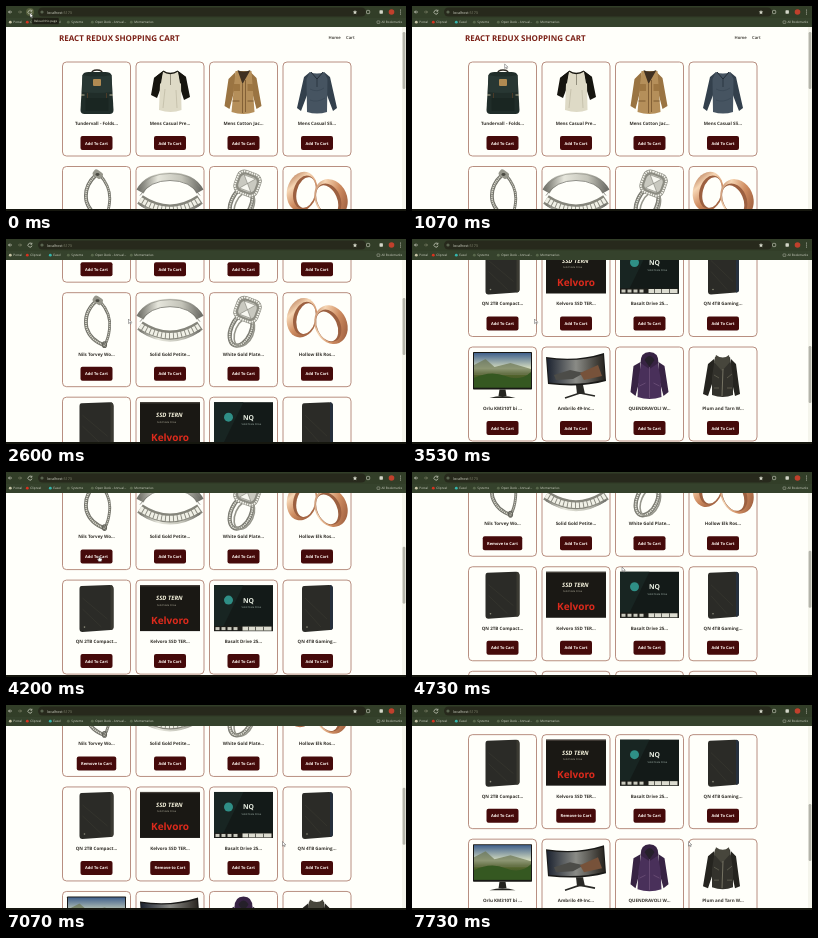
An HTML page that plays this animation: 400x205 px, repeating every 8000 ms.

```html
<!DOCTYPE html>
<html lang="en">
<head>
<meta charset="utf-8">
<title>Shopping cart</title>
<style>
html, body { margin: 0; width: 100%; height: 100%; overflow: hidden; background: #fffffa; }
svg { display: block; width: 100vw; height: 100vh; }
text { font-family: "Open Sans", "Noto Sans", sans-serif; text-rendering: geometricPrecision; }
</style>
</head>
<body>
<svg id="stage" viewBox="0 0 400 205">
  <defs>
    <linearGradient id="rose" x2="1" y2="1">
      <stop offset="0" stop-color="#a5623e"/><stop offset=".3" stop-color="#f6d6b4"/>
      <stop offset=".6" stop-color="#d08e62"/><stop offset="1" stop-color="#8a4c30"/>
    </linearGradient>
    <linearGradient id="silver">
      <stop offset="0" stop-color="#77776f"/><stop offset=".3" stop-color="#e6e6dc"/>
      <stop offset=".7" stop-color="#c3c3b8"/><stop offset="1" stop-color="#70706a"/>
    </linearGradient>
    <linearGradient id="sky" x2="0" y2="1">
      <stop offset="0" stop-color="#41618c"/><stop offset=".45" stop-color="#d8dfc0"/>
      <stop offset=".6" stop-color="#56662c"/><stop offset="1" stop-color="#2f4a22"/>
    </linearGradient>
    <linearGradient id="glow">
      <stop offset="0" stop-color="#1c2330"/><stop offset=".5" stop-color="#8a8b86"/>
      <stop offset="1" stop-color="#26221c"/>
    </linearGradient>
    <clipPath id="view"><rect y="21" width="400" height="182"/></clipPath>
  </defs>
  <rect width="400" height="205" fill="#fffffa"/>
  <g clip-path="url(#view)">
    <g id="page"></g>
    <rect x="396" y="21" width="4" height="182" fill="#f5f5ec"/>
    <rect id="thumb" x="396.6" width="2.8" height="57" rx="1.3" fill="#b4b4aa"/>
  </g>
  <g id="chrome"></g>
  <g id="tip"></g>
  <path id="arrow" d="M0 0V4.6L1.1 3.6L1.9 5.2L2.6 4.9L1.9 3.3H3.3Z" fill="#fff" stroke="#333" stroke-width=".4"/>
  <path id="hand" d="M-.4 0Q.4 -.6 .7 .2V2L2.8 2.6Q3.2 3 2.9 4L2.3 5.4H-.3L-1.7 3.3Q-1.5 2.5-.4 3.2Z" fill="#fff" stroke="#333" stroke-width=".4"/>
</svg>
<script>
const LOOP = 8000, PITCH_X = 73.5, PITCH_Y = 104.5;
const NOTCH = 26.15, GLIDE = 150;
const $ = id => document.getElementById(id);

const rect = (x, y, w, h, fill, rx = 0, more = '') =>
  `<rect x="${x}" y="${y}" width="${w}" height="${h}" rx="${rx}" fill="${fill}" ${more}/>`;
const path = (d, fill, stroke = 'none', w = .5, more = '') =>
  `<path d="${d}" fill="${fill}" stroke="${stroke}" stroke-width="${w}" ${more}/>`;
const line = (d, stroke, w = .5, more = '') => path(d, 'none', stroke, w, more);
const dot = (x, y, r, fill, more = '') => `<circle cx="${x}" cy="${y}" r="${r}" fill="${fill}" ${more}/>`;
const oval = (x, y, rx, ry, fill, stroke = 'none', w = 0, more = '') =>
  `<ellipse cx="${x}" cy="${y}" rx="${rx}" ry="${ry}" fill="${fill}" stroke="${stroke}" stroke-width="${w}" ${more}/>`;
const turn = (deg, x, y, body) => `<g transform="rotate(${deg} ${x} ${y})">${body}</g>`;
const text = (x, y, size, fill, str, weight = 400, anchor = 'start') =>
  `<text x="${x}" y="${y}" font-size="${size}" fill="${fill}" font-weight="${weight}" text-anchor="${anchor}">${str}</text>`;

// Product pictures, drawn inside a 68 x 94 card
const backpack = () =>
  line('M29 12Q29 8 34.5 8T40 12', '#2b2620', 1.4) +
  path('M20 13Q21 10 26 10H43Q48 10 49 13L51 48Q51 52 47 52H22Q18 52 18 48Z', '#202d29') +
  path('M20 13Q34 16 49 13L49.5 30Q34 32 19.5 30Z', '#283733') +
  line('M25 31V49M44 31V49', '#4a3a28', 1) +
  rect(30.5, 17, 8, 7, '#b08a52', 1) + rect(23, 36, 23, 13, '#1a2622', 1) +
  line('M18.5 33H22M47 33H50.5', '#c9c2a4', .9);

const raglan = () =>
  path('M27 9L18 16L15 33L21 36L26 23ZM42 9L50 15L54 35L48 38L43 23Z', '#16150f') +
  path('M27 9Q34 13 42 9L45 22L45.5 48Q35 52 23 48L24 22Z', '#dedac6') +
  path('M27 9L18 16L20 25L25 21ZM42 9L50 15L50 25L44 21Z', '#16150f') +
  line('M27 9Q34 14 42 9', '#16150f', 1.4) + line('M34.5 12V23', '#726d5c', .7) +
  line('M29 27L27 46M40 28L41 46', '#c2bda7', .8);

const jacket = () =>
  path('M26 10L19 17L15 44L20 47L25 28ZM41 10L47 16L52 44L47 47L42 28Z', '#9a7442') +
  path('M26 9L42 9L45 50Q34 54 22 50Z', '#b58f5a') +
  path('M28 8L33 22L41 8Q34 11 28 8Z', '#3f3022') +
  line('M33 22V51M36 18V50', '#6d4c28', .7) +
  rect(24, 22, 6.5, 7, '#9d7642', .6) + rect(38, 22, 5.5, 7, '#9d7642', .6) +
  line('M23 39H30M38 39H44', '#6d4c28', .8);

const longSleeve = () =>
  path('M27 10L21 15L14 46L18 49L26 28ZM41 10L47 15L54 46L50 49L42 28Z', '#33404c') +
  path('M27 10Q34 13 41 10L44.5 17L44 50Q34 53 24 50L23.5 17Z', '#465461') +
  line('M28 10L34 17L40 10', '#222c35', 1) + line('M34 17V25', '#222c35', .7) +
  line('M27 27Q34 31 41 26M27 38Q34 41 42 36', '#394753', .7);

const bracelet = () => {
  const left = 'M33 9Q21 20 24 35Q28 48 43 53', right = 'M37 8Q49 21 47 36Q46 46 42 53';
  return line(left, '#75756c', 3.8) + line(left, '#dadace', 1.7, 'stroke-dasharray="1.2 .8"') +
    line(right, '#75756c', 2.8) + line(right, '#cfcfc3', 1.1, 'stroke-dasharray="1.2 .8"') +
    turn(35, 35, 8, rect(30, 4, 10, 7, '#96968b', 2.5)) + oval(35, 8, 2, 1.4, '#4a4a42') +
    oval(42, 52, 2, 2.8, 'none', '#66665d', 1.2);
};

const bands = () => {
  const back = 'M4 25Q12 10 34 10T64 25', front = 'M4 33Q34 53 64 33';
  return line(back, 'url(#silver)', 8) + line('M4 21Q12 7 34 7T64 21', '#8a8a81', .6) +
    line('M4 29Q14 14 34 14T64 29', '#77776f', .8) +
    line(front, '#85857b', 10) + line(front, '#f0f0e6', 5.5, 'stroke-dasharray="3.1 .9"') +
    line('M4 38Q34 58 64 38', 'url(#silver)', 2);
};

const diamondRing = () =>
  turn(24, 32, 36,
    oval(32, 37, 10, 17, 'none', '#7d7d74', 4.2) + oval(32, 37, 10, 17, 'none', '#e4e4da', 1.6, 'stroke-dasharray="1.4 .8"') +
    oval(36, 38, 9, 15, 'none', '#96968c', 1.6)) +
  turn(20, 38, 17,
    rect(25, 4.5, 26, 25, '#8c8c82', 8) +
    rect(26.5, 6, 23, 22, 'none', 7, 'stroke="#f2f2ea" stroke-width="1.9" stroke-dasharray="1.6 .8"') +
    rect(29.5, 9, 17, 16, '#c9c9c0', 5) +
    path('M32 10L38 17L44 10ZM32 24L38 17L44 24Z', '#f7f7f0', '#77776f', .5));

const wideBand = (x, y, rx, ry, deg, dx) =>
  turn(deg, x, y, oval(x, y, rx, ry, 'url(#rose)') + oval(x + dx, y, rx * .74, ry * .84, '#9c6040') +
    oval(x + dx * 1.6, y, rx * .62, ry * .78, '#fffffa'));
const roseRings = () => wideBand(19, 25, 15, 20, 14, 2.6) + wideBand(48, 32, 16, 20, -24, -2.6);

const drive = (x, w, edge) => () =>
  path(`M${x + 2} 6L${x + w - 4} 5Q${x + w} 5 ${x + w} 9V47Q${x + w} 50 ${x + w - 3} 50L${x + 3} 52Q${x} 52 ${x} 49V9Q${x} 6 ${x + 2} 6Z`, '#2b2b27') +
  path(`M${x + w - 3} 5Q${x + w} 5 ${x + w} 9V47Q${x + w} 50 ${x + w - 3} 50Z`, edge) +
  line(`M${x + 3} 18L${x + w - 6} 39M${x + 3} 29L${x + w - 12} 47`, '#36362f', .8) +
  dot(x + 5, 47, .8, '#8b8b7b');

const ssdRed = () =>
  rect(4, 5, 60, 46, '#1a1814') + rect(4, 5, 60, 1.2, '#45403a') +
  `<g font-style="italic">${text(20, 20, 6, '#f2efda', 'SSD TERN', 700)}</g>` +
  text(21, 25.5, 2.5, '#b5b2a0', 'Solid State Drive') +
  text(34, 43.5, 10, '#dc2a1c', 'Kelvoro', 700, 'middle');

const ssdTeal = () =>
  rect(4.5, 5, 59, 46, '#131a18') + path('M4.5 5H34L14 46H4.5Z', '#182522') +
  dot(19, 20, 4.5, '#2f8f86') + text(33.5, 22.5, 6.8, '#e8eee2', 'NQ', 700) +
  text(32, 28, 2.6, '#a3b5ac', 'Solid State Drive') +
  rect(4.5, 46, 59, 5, '#1c1c18') +
  [6, 12, 18, 24].map(x => rect(x, 47, 4, 3, '#c9c9bd')).join('') +
  rect(33, 46.5, 29, 4, '#dcdcd0') + line('M39 46.5V50.5M46 46.5V50.5M54 46.5V50.5', '#3a3a34', .8);

const monitor = () =>
  rect(4.5, 5, 59, 37.5, '#181815', .7) + rect(5.5, 6, 57, 34.5, 'url(#sky)') +
  path('M5.5 18L17 12L26 20L42 16L62.5 22V28H5.5Z', '#6d7752', 'none', 0, 'opacity=".7"') +
  path('M5.5 31Q22 23 37 29T62.5 25V40.5H5.5Z', '#355821') +
  path('M31 42.5H37L38 49H30Z', '#24241f') + path('M21 51Q34 47 47 51Z', '#24241f');

const wideMonitor = () =>
  path('M4 10Q34 15 62 6L64 34Q39 41 6 37Z', '#191917') +
  path('M5 11.5Q35 16 61 8L63 32.5Q38 39 7 35.5Z', 'url(#glow)') +
  path('M12 28L28 23L42 26L31 32L14 33Z', '#4c4c48') + path('M38 26L56 18L60 29L42 33Z', '#77523a') +
  path('M34 38H41L43 47H35Z', '#292925') + line('M23 51L38 46L53 49', '#292925', 1.6);

const hooded = (body, dark, lite) => () =>
  path('M25 15L18 19L15 45L20 49L25 30ZM43 15L49 19L53 45L48 49L43 30Z', dark) +
  path('M26 14L42 14L45 31L46 50Q34 54 22 50L23 31Z', body) +
  path('M25 16Q25 5 34 5T43 16L34 22Z', dark) + path('M29 13Q34 5 39 13L34 20Z', '#25202a') +
  line('M34 20V51', lite, .8) + line('M24 39L30 36M44 39L38 36', lite, .8);

const biker = () =>
  path('M25 12L19 17L14 47L19 49L25 31ZM42 12L47 17L51 47L46 49L42 31Z', '#25241f') +
  path('M26 10Q34 13 41 10L44 30L44 48Q34 52 23 48L23 30Z', '#33322c') +
  path('M27 8L25 15L33 24L41 15L40 8Q34 13 27 8Z', '#47463c') +
  line('M34 22L33 49', '#918f7a', .7) + line('M25 28L30 31M43 27L38 31M25 41H30M38 41H43', '#737160', .6);

const items = [
  ['Tundervall - Folds...', backpack], ['Mens Casual Pre...', raglan],
  ['Mens Cotton Jac...', jacket], ['Mens Casual Sli...', longSleeve],
  ['Nils Torvey Wo...', bracelet], ['Solid Gold Petite...', bands],
  ['White Gold Plate...', diamondRing], ['Hollow Elk Ros...', roseRings],
  ['QN 2TB Compact...', drive(17, 34, '#3b3a32')], ['Kelvoro SSD TER...', ssdRed],
  ['Basalt Drive 25...', ssdTeal], ['QN 4TB Gaming...', drive(19, 31, '#26303d')],
  ['Orlu KM310T bi ...', monitor], ['Ambrilo 49-Inc...', wideMonitor],
  ['QUENDRAVOLI W...', hooded('#49305a', '#372343', '#6d5179')], ['Plum and Tarn W...', biker]
];

const button = (w, label) =>
  rect(34 - w / 2, 74, w, 14, '#450a0a', 2) + text(34, 82.5, 4, '#fff8f2', label, 700, 'middle');

const card = ([name, draw], i) =>
  `<g transform="translate(${56.5 + i % 4 * PITCH_X} ${56 + Math.floor(i / 4) * PITCH_Y})">` +
  rect(0, 0, 68, 94, '#fffffa', 4, 'stroke="#a06a58" stroke-width=".75"') + draw() +
  text(34, 62.9, 4.5, '#33302a', name, 700, 'middle') +
  `<g id="add${i}">${button(32, 'Add To Cart')}</g>` +
  `<g id="remove${i}" display="none">${button(39.5, 'Remove to Cart')}</g></g>`;

$('page').innerHTML =
  text(53, 34.7, 8, '#7b2016', 'REACT REDUX SHOPPING CART', 700) +
  text(322.5, 33.4, 4.2, '#33302a', 'Home', 600) + text(340, 33.4, 4.2, '#33302a', 'Cart', 600) +
  items.map(card).join('');

const pale = '#d3d6c8';
const bookmarks = [
  [3, '#c9c6a8', 'Postal'], [20, '#d8321f', 'Clipreel'], [43, '#35b6ad', 'Easel'],
  [61, '#59684c', 'Systems'], [85, '#59684c', 'Open Desk - Annual...'], [124, '#59684c', 'Momentaries']
];
$('chrome').innerHTML =
  rect(0, 0, 400, 21, '#35422c') + rect(0, 0, 400, 12, '#323e28') +
  rect(32, 1.5, 328, 9, '#27291c', 4.5) +
  line('M6 6H2.5M4 4.5L2.5 6L4 7.5', pale, .7) + line('M12 6H15.5M14 4.5L15.5 6L14 7.5', '#7f866b', .7) +
  dot(24, 6, 4, '#56603d', 'id="halo"') +
  line('M25.7 5A2 2 0 1 0 26 6.6M25.9 3.7V5.2H24.4', pale, .7) +
  dot(36, 6, 1.6, '#5a6450') +
  `<text x="41" y="7.5" font-size="3.7" fill="${pale}">localhost<tspan fill="#8f917a">:5173</tspan></text>` +
  path('M349 4L349.7 5.5L351.2 5.6L350 6.7L350.4 8.2L349 7.4L347.6 8.2L348 6.7L346.8 5.6L348.3 5.5Z', pale) +
  rect(360.5, 4.4, 3.2, 3.2, 'none', .8, `stroke="${pale}" stroke-width=".6"`) +
  rect(373.5, 4.3, 3.4, 3.4, pale, .6) +
  dot(385.5, 6, 2.8, '#c0402c') + [4, 6, 8].map(y => dot(394.5, y, .5, pale)).join('') +
  bookmarks.map(([x, c, s]) => dot(x + 1.3, 16.2, 1.4, c) + text(x + 4.3, 17.4, 3.1, pale, s)).join('') +
  rect(371, 14.9, 2.8, 2.5, 'none', .4, `stroke="${pale}" stroke-width=".4"`) +
  text(375.5, 17.4, 3.1, pale, 'All Bookmarks') +
  rect(0, 203, 400, 2, '#16170f');
$('tip').innerHTML = rect(26, 11.5, 27, 7, '#1f2016', 1.2, 'stroke="#4a5036" stroke-width=".3"') +
  text(28, 16.1, 3, '#eeeeda', 'Reload this page');

// Wheel bursts: first notch, time between notches, number of notches, direction
const wheel = [[2190, 94, 10, 1], [3580, 94, 4, -1], [4655, 0, 1, 1], [7370, 180, 2, 1]];
// Pointer stops: time, x, y
const stops = [[0, 24, 7], [500, 24, 7], [1400, 122.5, 80], [3950, 122.5, 80], [4150, 93, 84], [4350, 93, 84],
  [4660, 210, 95], [5180, 210, 95], [5650, 176, 159], [6150, 176, 159], [6700, 276.5, 136.5]];

function ease(u) {
  u = Math.min(1, Math.max(0, u));
  return u * u * (3 - 2 * u);
}

function scrollAt(t) {
  let sum = 0;
  for (const [first, gap, count, dir] of wheel)
    for (let k = 0; k < count; k++) sum += dir * ease((t - first - k * gap) / GLIDE);
  return sum * NOTCH;
}

function pointerAt(t) {
  const n = stops.findIndex(p => p[0] > t);
  if (n < 0) return stops[stops.length - 1].slice(1);
  const [t0, x0, y0] = stops[n - 1], [t1, x1, y1] = stops[n];
  const e = ease((t - t0) / (t1 - t0));
  return [x0 + (x1 - x0) * e, y0 + (y1 - y0) * e];
}

const show = (id, on) => $(id).setAttribute('display', on ? 'inline' : 'none');
function setRemoved(i, on) {
  show('add' + i, !on);
  show('remove' + i, on);
}

function render(t) {
  const s = scrollAt(t), [x, y] = pointerAt(t);
  $('page').setAttribute('transform', `translate(0 ${-s})`);
  $('thumb').setAttribute('y', 26 + s * .31);
  setRemoved(4, t >= 4230);
  setRemoved(9, t >= 5960);
  show('tip', t < 500);
  show('halo', t < 560);
  const over = (t > 4080 && t < 4400) || (t > 5560 && t < 6270);
  show('hand', over);
  show('arrow', !over);
  $(over ? 'hand' : 'arrow').setAttribute('transform', `translate(${x} ${y})`);
}

const start = performance.now();
function tick() {
  render((performance.now() - start) % LOOP);
  requestAnimationFrame(tick);
}
tick();
</script>
</body>
</html>
```
